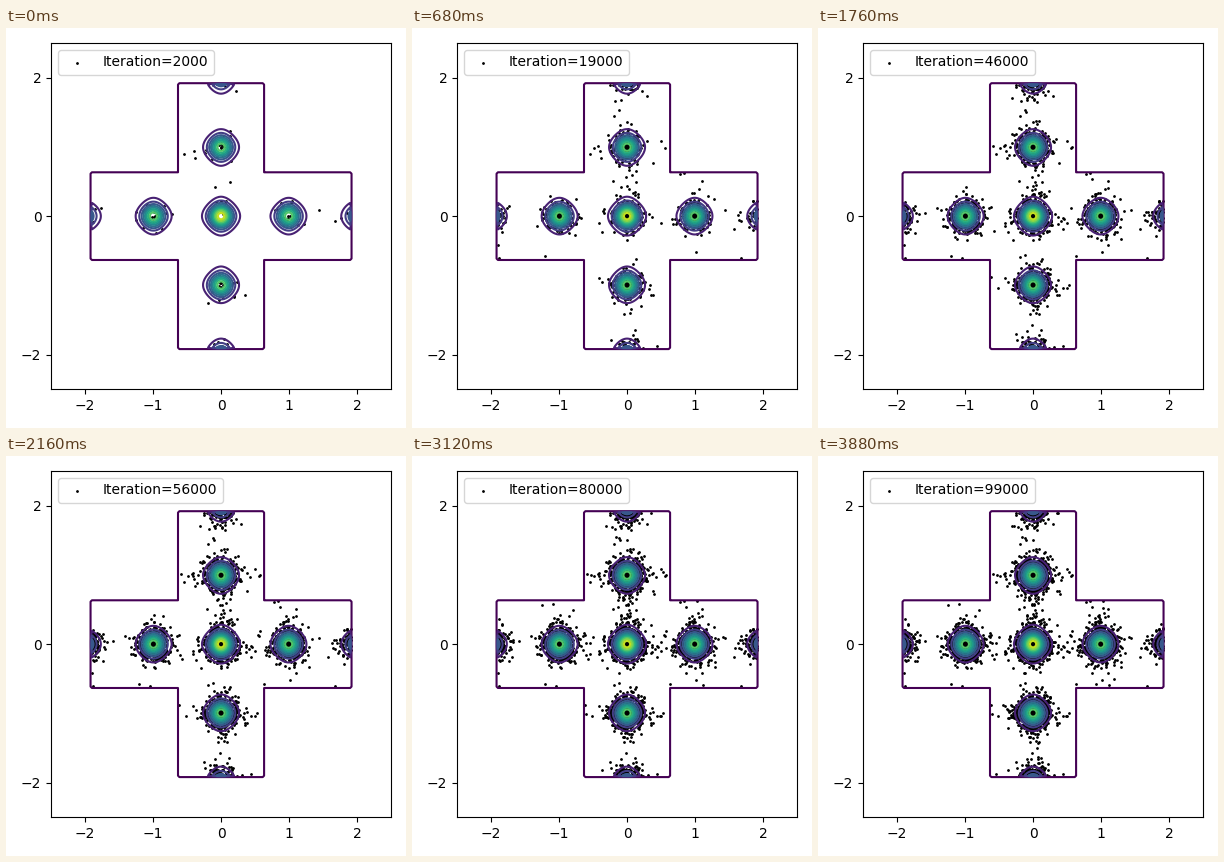
Recreate the animation shown at these times as a matplotlib script. Size 400x400 px, loop 3.92 s.

```python
import numpy as np
import matplotlib.pyplot as plt
from matplotlib.animation import FuncAnimation

FRAMES = 98
INTERVAL = 40
FIRST, STEP = 150, 75          # samples at the start, added per frame
HALF_ARM, REACH = 0.62, 1.91   # cross-shaped domain
TEMPERATURE = 5
SHARPNESS = 1.3                # concentrates the samples around the modes


def density(x, y):
    """Boltzmann weight of a Rastrigin potential, zero outside the cross."""
    waves = np.cos(2 * np.pi * x) + np.cos(2 * np.pi * y)
    weight = np.exp((10 * waves - x**2 - y**2) / TEMPERATURE)
    near = np.minimum(np.abs(x), np.abs(y))
    far = np.maximum(np.abs(x), np.abs(y))
    return np.where((near < HALF_ARM) & (far < REACH), weight, 0)


def draw_samples(rng, tries):
    """Rejection sampling on the square around the cross."""
    pts = rng.uniform(-REACH, REACH, (tries, 2))
    chance = (density(*pts.T) / density(0, 0)) ** SHARPNESS
    return pts[rng.random(tries) < chance]


samples = draw_samples(np.random.default_rng(7), 400_000)

fig, ax = plt.subplots(figsize=(4, 4), dpi=100)
ax.set(xlim=(-2.5, 2.5), ylim=(-2.5, 2.5),
       xticks=range(-2, 3), yticks=(-2, 0, 2))

axis = np.linspace(-2, 2, 200)
gx, gy = np.meshgrid(axis, axis)
ax.contour(gx, gy, density(gx, gy), levels=np.arange(0, 56, 5),
           cmap="viridis", vmin=0, vmax=55)
dots = ax.scatter([], [], s=1, c="black", label="Iteration=2000")
label = ax.legend(loc="upper left").get_texts()[0]
fig.tight_layout()


def update(i):
    dots.set_offsets(samples[:FIRST + STEP * i])
    label.set_text(f"Iteration={2000 + 1000 * i}")
    return dots, label


anim = FuncAnimation(fig, update, frames=FRAMES, interval=INTERVAL,
                     repeat=True, repeat_delay=0, blit=False)
plt.show()
```
